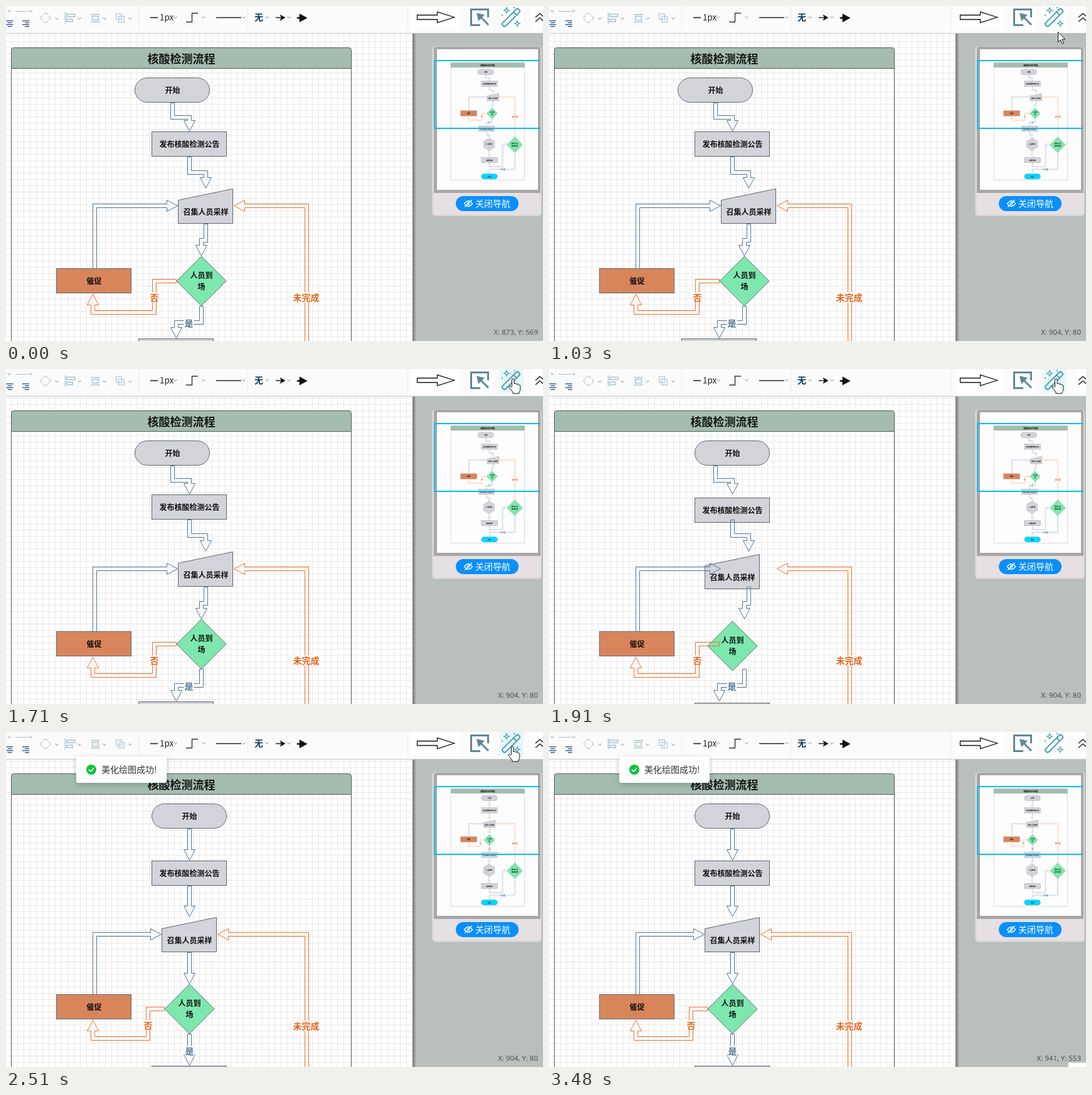
Animation of 856x534 px, one loop 3890 ms. Source, as an HTML page:

```html
<!DOCTYPE html>
<html lang="zh">
<head>
<meta charset="utf-8">
<title>流程图美化</title>
<style>
html, body { margin: 0; width: 100%; height: 100%; overflow: hidden; background: #fff; }
svg { display: block; width: 856px; height: 534px; }
text { font-family: "Noto Sans CJK SC", "Noto Sans CJK", "Noto Sans", sans-serif; }
.node { fill: #d3d4da; stroke: #62666e; }
.link { fill: none; stroke: #4f7595; }
.warm { stroke: #ee7028; }
.chev { fill: none; stroke: #8a929b; }
.tile { fill: #fff; }
.tile.hover { fill: #e9f7f9; }
.ico { fill: none; stroke: #a9c4d2; stroke-width: 1.5; }
#toast { animation: toast 3890ms step-end infinite; }
@keyframes toast { 0% { opacity: 0; } 52.7% { opacity: .3; } 54.5% { opacity: .7; } 56.04% { opacity: 1; } }
</style>
</head>
<body>
<svg viewBox="0 0 856 534">
  <defs id="defs">
    <pattern id="grid" x="8" y="6" width="10" height="10" patternUnits="userSpaceOnUse">
      <path d="M.5 0V10M0 .5H10" stroke="#e9e9ea"/>
    </pattern>
    <linearGradient id="edge">
      <stop offset="0" stop-color="#6f7472"/>
      <stop offset="1" stop-color="#b8bfbc"/>
    </linearGradient>
    <filter id="shade" x="-20%" y="-40%" width="140%" height="190%">
      <feDropShadow dx="0" dy="3" stdDeviation="5" flood-opacity=".2"/>
    </filter>
  </defs>

  <rect width="856" height="534" fill="#b8bfbc"/>
  <rect width="648" height="534" fill="#fff"/>
  <rect width="648" height="534" fill="url(#grid)"/>
  <rect x="648" y="43" width="6" height="491" fill="url(#edge)"/>
  <g id="main" transform="translate(.5 .5)"></g>

  <!-- toolbar -->
  <rect width="856" height="43" fill="#fbfbfb"/>
  <path d="M0 43.5H856" stroke="#c4c6c6"/>
  <path d="M211.5 0V38M385.5 0V38M640.5 0V38" stroke="#ececec"/>
  <g id="chevs" class="chev"></g>
  <path d="M15 8.5H35" stroke="#b4b9be"/>
  <g id="bars" fill="#28507a"></g>
  <g class="ico">
    <path id="nib" d="M59 14l4-3 4 3" stroke="#c6d2dc"/>
    <use href="#nib" transform="rotate(90 63 19)"/>
    <use href="#nib" transform="rotate(180 63 19)"/>
    <use href="#nib" transform="rotate(270 63 19)"/>
    <path d="M94.5 10V28M97 13H110V17H97ZM97 21H106V25H97Z"/>
    <path d="M135 13.5H150M135 25.5H150M137.5 16.5H147.5V22.5H137.5Z"/>
    <path d="M175.5 12.5h9v9h-9ZM179.500 16.500h9v9h-9Z" stroke="#bccce2"/>
  </g>
  <path d="M230 18.5H242" stroke="#222" stroke-width="1.6"/>
  <text x="245" y="23" font-size="13.5" fill="#222">1px</text>
  <path d="M287 25.5H296.5V11.5H306" fill="none" stroke="#333" stroke-width="1.4"/>
  <path d="M335 18.5H375M430 18.5H440" stroke="#222" stroke-width="1.3"/>
  <text x="396" y="23" font-size="14" fill="#123a5a" font-weight="700">无</text>
  <path d="M437 14L445 18.5L437 23L439 18.5ZM468 12.5L480 19L468 25.5ZM464 18H469V20H464Z" fill="#111" stroke="#111" stroke-width=".6"/>
  <rect class="tile" x="645" width="80" height="38"/>
  <path d="M655.5 14.5H687.5V9.5L714.500 18L687.5 26.5V21.5H655.5Z" fill="#fff" stroke="#111" stroke-width="1.3"/>
  <rect id="penTile" class="tile" x="736" width="39" height="38"/>
  <rect id="wandTile" class="tile" x="786" width="39" height="38"/>
  <rect class="tile" x="836" width="20" height="38"/>
  <g fill="none" stroke="#5f8898" stroke-width="3">
    <path d="M756 30.5H741.5V5.5H768.5V18M754 15L769 30"/>
    <path d="M750 11L763 14L753 24Z" fill="#5f8898" stroke="none"/>
  </g>
  <g fill="none" stroke="#419fb0" stroke-width="2">
    <rect x="-18" y="-3.5" width="36" height="7" rx="3" transform="translate(805 18.5) rotate(-45)"/>
    <path d="M809 9.5l5 5M809 2.5h2M790 14.5h2"/>
    <path id="star" d="M798 2.5l1.3 3.2 3.2 1.3-3.2 1.3-1.3 3.2-1.3-3.2-3.2-1.3 3.2-1.3Z" stroke-width="1.2"/>
    <use href="#star" x="17" y="21"/>
  </g>
  <path d="M844 18l7-6 7 6M844 25l7-6 7 6" fill="none" stroke="#222" stroke-width="1.5"/>

  <!-- navigator -->
  <rect x="679.5" y="64.5" width="174" height="270" rx="5" fill="#dedcdd" stroke="#cfcdce"/>
  <path d="M682 298V69q0-4 4-4H848q4 0 4 4V298Z" fill="#a8a6a8"/>
  <rect x="682" y="298" width="170" height="34" fill="#e6e0e3"/>
  <rect x="687" y="69" width="161" height="224" fill="#fdfdfd"/>
  <g id="mini" transform="translate(707.3 76.2) scale(.217)"></g>
  <path d="M852 87H683V195H852" fill="none" stroke="#00bdf5" stroke-width="2"/>
  <rect x="717" y="303" width="100" height="24" rx="12" fill="#0a8ffb"/>
  <path d="M730.5 315q6.5-8.5 13 0q-6.5 8.5-13 0ZM731.5 320.5L742.5 309" fill="none" stroke="#fff" stroke-width="1.3"/>
  <circle cx="737" cy="315" r="2" fill="none" stroke="#fff"/>
  <text x="748" y="320" font-size="14" fill="#fff" font-weight="500">关闭导航</text>
  <text id="pos" x="848" y="524" text-anchor="end" fill="#444a48" style="font:11.500px 'Open Sans', sans-serif"></text>

  <g id="toast">
    <rect x="112" y="39" width="144" height="42" rx="3" fill="#fff" filter="url(#shade)"/>
    <circle cx="136" cy="60" r="8" fill="#0cc53c"/>
    <path d="M132 60l3 3 5-5.5" fill="none" stroke="#fff" stroke-width="1.8"/>
    <text x="152" y="65" font-size="14" fill="#333">美化绘图成功!</text>
  </g>
  <rect id="tip" x="828" y="527" width="28" height="7" fill="#fff"/>
  <path id="arrow" d="M.5 .5V16.5L4.200 13L7 19L9.500 18L6.800 12H11.800Z" fill="#fff" stroke="#111"/>
  <path id="hand" d="M-1.500 13V2q0-1.800 1.700-1.800T2 2V8.500q3-1 4 .8q2.500-.7 3.300 1q2.500-.4 2.500 2V17q0 3-2 5V24H0V22L-5.500 15q-1.200-2 .3-2.700T-1.500 14.500" fill="#fff" stroke="#111"/>
</svg>
<script>
const $ = id => document.getElementById(id);
const LOOP = 3890;
const GREY = '#d3d4da', GREEN = '#7de8ae', ORANGE = '#e8641b', BLUE = '#4f7595';

const text = (s, x, y, size = 12, fill = '#111') =>
  `<text x="${x}" y="${y + size * .37}" font-size="${size}" font-weight="700" text-anchor="middle" fill="${fill}">${s}</text>`;
// Boxes are placed by top centre
const box = (s, x, y, r = 0, fill = GREY) =>
  `<rect class="node" x="${x - 60}" y="${y}" width="119" height="39" rx="${r}" style="fill:${fill}"/>` + text(s, x, y + 20);
const poly = (pts, fill = GREY) => `<polygon class="node" points="${pts}" style="fill:${fill}"/>`;
const ring = (n, x, y, r, fill) => poly(Array.from({ length: n }, (_, i) => {
  const a = i * 2 * Math.PI / n;
  return [x + r * Math.sin(a), y - r * Math.cos(a)];
}), fill);
const diamond = ([a, b], x, y, r) => ring(4, x, y, r, GREEN) + text(a, x, y - 9) + text(b, x, y + 9);
const slope = (s, x, y) =>
  poly([[x - 44, y + 18], [x + 43, y], [x + 43, y + 55], [x - 44, y + 55]]) + text(s, x, y + 37);
const label = (s, x, y, fill) => {
  const w = s.length * 14 + 2;
  return `<rect x="${x - w / 2}" y="${y - 8}" width="${w}" height="16" fill="#fff"/>` + text(s, x, y, 14, fill);
};

// Hollow arrow along a right-angled centre line
function flex(pts, warm) {
  const half = 3, wing = 9, head = 17, n = pts.length - 1;
  const normals = pts.slice(1).map(([x, y], i) => [Math.sign(y - pts[i][1]), -Math.sign(x - pts[i][0])]);
  const [tx, ty] = pts[n], [ex, ey] = normals[n - 1];
  const side = k => pts.slice(0, n).map(([x, y], i) => {
    const [ax, ay] = normals[i], [bx, by] = i ? normals[i - 1] : [0, 0];
    return [x + k * (ax + bx), y + k * (ay + by)];
  });
  const neck = k => [tx + ey * head + ex * k, ty - ex * head + ey * k];
  const out = [...side(half), neck(half), neck(wing), [tx, ty], neck(-wing), neck(-half), ...side(-half).reverse()];
  return `<polygon class="link${warm ? ' warm' : ''}" points="${out.join(' ')}"/>`;
}
// Downward arrow, stepping sideways halfway
function drop(x0, y0, x1, y1) {
  const mid = Math.round((y0 + y1) / 2);
  return flex(x0 === x1 ? [[x0, y0], [x1, y1]] : [[x0, y0], [x0, mid], [x1, mid], [x1, y1]]);
}

const AXIS = 292, URGE = { x: 140, y: 418 }, DONE = { x: 478, y: 668, r: 58 }, HEX = { x: 289, y: 665, r: 46 };
const STORE = 761, END = 882, R = 39.5;

const before = { start: 265, notice: 200, sx: 318, sy: 291, ax: 311, ay: 438, cx: 271, cy: 530 };
const after = { start: AXIS, notice: 205, sx: AXIS, sy: 295, ax: AXIS, ay: 441, cx: AXIS, cy: 532 };

const base =
  `<path d="M8 99V70q0-4 4-4H546q4 0 4 4V99Z" fill="#a4bdb0" stroke="#555c58"/>
   <path d="M8 99V928H550V99" fill="none" stroke="#555c58"/>` +
  text('核酸检测流程', 279, 83.5, 18, '#151515') +
  box('催促', URGE.x, URGE.y, 0, '#d9855b') +
  ring(6, HEX.x, HEX.y, HEX.r) + text('人员检测', HEX.x, HEX.y) +
  box('采集样本', AXIS, STORE) + box('结束', AXIS, END, 20, '#00d8ff') +
  diamond(['所有人员', '采样完成'], DONE.x, DONE.y, DONE.r);

const nodes = s =>
  box('开始', s.start, 114, 20) + box('发布核酸检测公告', AXIS, s.notice) + slope('召集人员采样', s.sx, s.sy) +
  diamond(['人员到', '场'], s.ax, s.ay, R) + box('核对采样人员信息', s.cx, s.cy);

function links(s) {
  const inY = s.sy + 27, left = s.ax - 40, bend = Math.round((left + URGE.x + 60) / 2);
  const low = URGE.y + 70, under = END - 33, turn = 388;
  return drop(s.start, 154, AXIS, s.notice - 1) +
    drop(AXIS, s.notice + 40, s.sx, s.sy - 1) +
    drop(s.sx, s.sy + 56, s.ax, s.ay - 40) +
    flex([[URGE.x + 1, URGE.y], [URGE.x + 1, inY], [s.sx - 45, inY]]) +
    flex([[DONE.x + 1, DONE.y - DONE.r], [DONE.x + 1, inY], [s.sx + 45, inY]], true) +
    flex([[left, s.ay], [bend, s.ay], [bend, low], [URGE.x - 2, low], [URGE.x - 2, URGE.y + 41]], true) +
    drop(s.ax, s.ay + 40, s.cx, s.cy - 1) +
    drop(s.cx, s.cy + 40, HEX.x, HEX.y - HEX.r) +
    drop(HEX.x, HEX.y + HEX.r, AXIS, STORE) +
    flex([[AXIS, STORE + 40], [AXIS, under - 20], [turn, under - 20], [turn, DONE.y], [DONE.x - DONE.r, DONE.y]]) +
    flex([[DONE.x, DONE.y + DONE.r], [DONE.x, under], [AXIS, under], [AXIS, END]]) +
    label('已完成', turn, under, BLUE) +
    label('否', bend, s.ay + 26, ORANGE) +
    label('是', Math.round((s.ax + s.cx) / 2), Math.round((s.ay + s.cy) / 2 + 21), BLUE) +
    label('未完成', DONE.x, inY + 146, ORANGE);
}

const group = (id, body) => `<g id="${id}">${body}</g>`;
$('defs').insertAdjacentHTML('beforeend', group('base', base) +
  group('nodesA', nodes(before)) + group('nodesB', nodes(after)) +
  group('linksA', links(before)) + group('linksB', links(after)));
for (const id of ['main', 'mini'])
  $(id).innerHTML = '<use href="#base"/><use class="n"/><use class="l"/>';

const chev = (x, y) => `<path d="M${x - 2.5} ${y - 1.5}l2.5 3 2.5-3"/>`;
$('chevs').innerHTML = chev(5, 8) + chev(39, 8) +
  [81, 117, 157, 198].map(x => chev(x, 20)).join('') +
  [270, 315, 379, 416, 451].map(x => chev(x, 18)).join('');
for (let i = 0; i < 4; i++) {
  const w = i % 2 ? 7 : 11, y = 23 + 3 * i;
  $('bars').innerHTML += `<rect x="${6 - w / 2}" y="${y}" width="${w}" height="1.3"/>` +
    `<rect x="${37 - w}" y="${y}" width="${w}" height="1.3"/>`;
}

function show(id, n, l) {
  $(id).querySelector('.n').setAttribute('href', '#nodes' + n);
  $(id).querySelector('.l').setAttribute('href', '#links' + l);
}

// Pointer stops: time, x, y
const stops = [[260, 846, 520], [400, 811, 339], [750, 776, 98], [1030, 811, 41], [1170, 748, 22],
  [1310, 808, 15], [2500, 808, 15], [2510, 807, 23], [2650, 758, 22], [3080, 840, 480], [3400, 848, 516]];
const easeOut = k => 1 - (1 - k) ** 3;

// The pointer is sampled every 70 ms and eases out towards each stop
function pointer(t) {
  const from = t < 2510 ? 260 : 2510;
  t = Math.min(3400, Math.max(260, from + Math.floor((t - from) / 70) * 70));
  const i = Math.max(1, stops.findIndex(s => s[0] >= t));
  const [t0, x0, y0] = stops[i - 1], [t1, x1, y1] = stops[i];
  const k = easeOut((t - t0) / (t1 - t0));
  return [Math.round(x0 + (x1 - x0) * k), Math.round(y0 + (y1 - y0) * k)];
}
// The readout holds its value while the pointer is off the bare canvas
function readout(t) {
  if (t < 260) return [780, 532];
  const p = pointer(t);
  if (p[1] > 336) return p;
  return [811, t < 960 ? 339 : 43];
}

const start = performance.now();
function draw() {
  const t = (performance.now() - start) % LOOP;
  const routed = t >= 1980 ? 'B' : 'A';
  show('main', t >= 1910 ? 'B' : 'A', routed);
  show('mini', routed, routed);

  const seen = t >= 260 && t < 3480;
  const [x, y] = pointer(t);
  const over = seen && y < 38, wand = over && x >= 786, pen = over && x >= 736 && x < 775;
  const place = (id, on) => {
    $(id).setAttribute('transform', `translate(${x} ${y})`);
    $(id).style.display = on ? '' : 'none';
  };
  place('hand', wand || pen);
  place('arrow', seen && !wand && !pen);
  $('wandTile').classList.toggle('hover', wand);
  $('penTile').classList.toggle('hover', pen);
  $('tip').style.display = t >= 3480 ? '' : 'none';

  const [px, py] = readout(t);
  $('pos').textContent = `X: ${px + 93}, Y: ${py + 37}`;
  requestAnimationFrame(draw);
}
draw();
</script>
</body>
</html>
```
